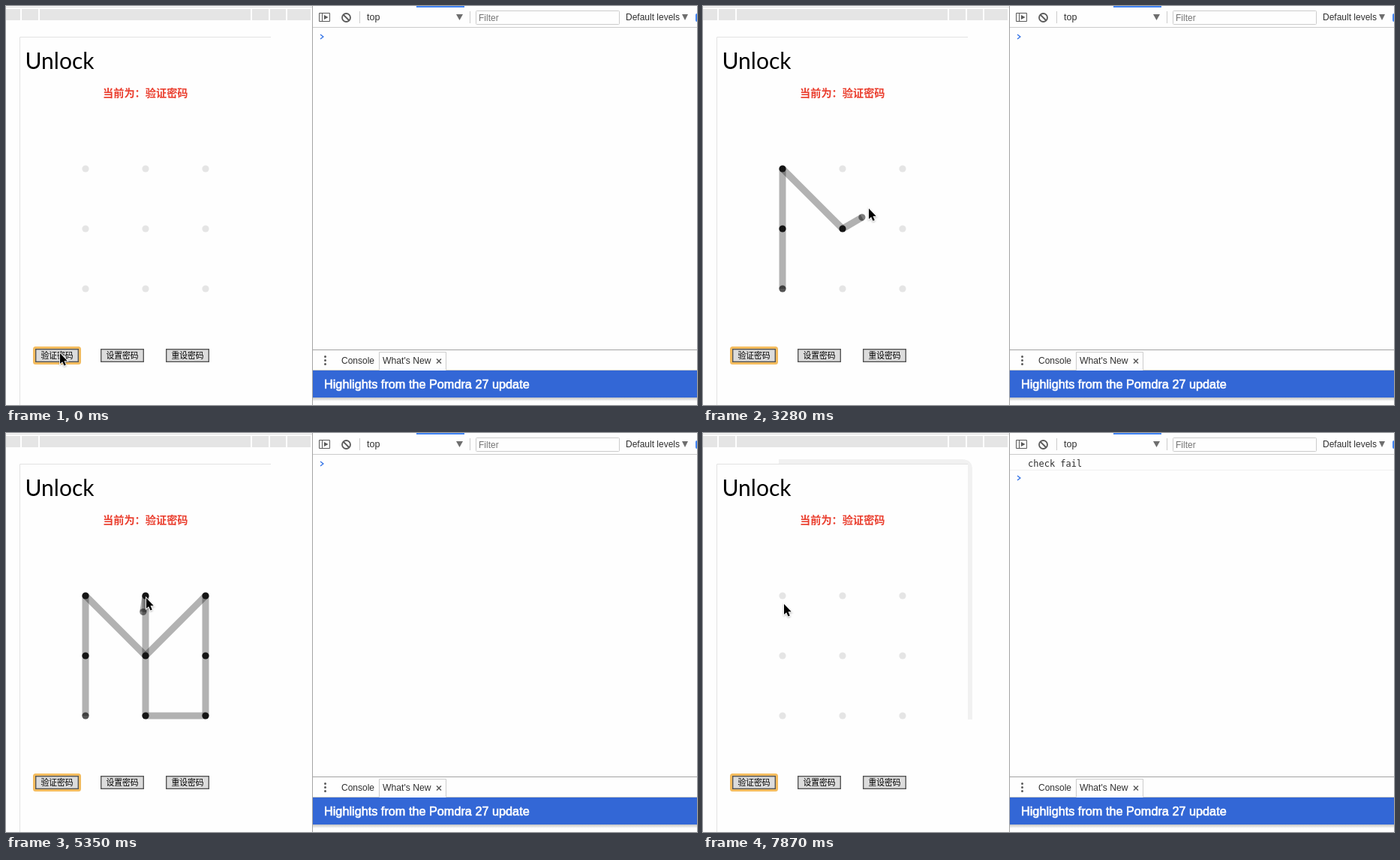
These frames come from a looping animation (921x532 px, 8 s). An HTML page:

```html
<!DOCTYPE html>
<html lang="zh-CN">
<head>
<meta charset="utf-8">
<title>Pattern unlock</title>
<style>
  html, body { margin: 0; width: 100%; height: 100%; overflow: hidden; background: #fefefe; }
  svg { display: block; width: 921px; height: 532px; }
  text { font: 12px "Liberation Sans", Arial, sans-serif; fill: #303030; white-space: pre; }
  .title { font: 30px Lato, sans-serif; fill: #000; }
  .mode { font: bold 14.2px "Noto Sans CJK SC", "Noto Sans CJK", sans-serif; fill: #ea3e2e; }
  .button { font: 10.8px "Noto Sans CJK SC", "Noto Sans CJK", sans-serif; fill: #000; }
  .headline { font-size: 16.25px; fill: #fff; stroke: #fff; stroke-width: .6px; }
  .log { font: 12px "DejaVu Sans Mono", monospace; }
  .line { fill: none; stroke: #ccc; }
  .icon { fill: none; stroke: #5a5a5a; }
</style>
</head>
<body>
<svg viewBox="0 0 921 532">
  <rect width="921" height="532" fill="#fefefe"/>

  <!-- Page -->
  <path class="line" d="M0 1.5H408" style="stroke:#ddd"/>
  <rect y="4" width="406" height="15" fill="#e5e5e5"/>
  <path d="M20 4V19M44 4V19M327 4V19M351 4V19M374 4V19" stroke="#fefefe" stroke-width="2"/>
  <path id="shade" d="M101 35H345Q359 35 359 49V382H353V41H101Z" fill="#f1f1f1"/>
  <path class="line" d="M353 41.5H18.5V532" style="stroke:#e2e2e2"/>
  <text class="title" x="25.5" y="84">Unlock</text>
  <text class="mode" x="129" y="121">当前为：验证密码</text>
  <rect x="37.5" y="455.5" width="61" height="21" rx="2" fill="none" stroke="#f3bc5f" stroke-width="3"/>
  <g id="buttons"></g>
  <g id="pattern"></g>

  <!-- Console toolbar -->
  <path class="line" d="M408.5 0V532M409 458.5H921" style="stroke:#a3a3a3"/>
  <path class="line" d="M409 28.5H921M471.5 7V23M618.5 7V23"/>
  <rect x="547" width="64" height="2" fill="#4285f4"/>
  <path class="icon" d="M417.5 9.5H431.5V20.5H417.5ZM421.5 9.5V20.5"/>
  <path d="M424 12L429.5 15L424 18Z" fill="#5a5a5a"/>
  <g class="icon" stroke-width="1.8"><circle cx="453.5" cy="15.5" r="5.5"/><path d="M449.5 11.5L457.5 19.5"/></g>
  <path d="M600 11H609L604.5 19ZM901 11H909L905 19Z" fill="#6e6e6e"/>
  <text x="481" y="19" style="font-size:12.6px">top</text>
  <rect class="line" x="626.5" y="6.5" width="191" height="18" rx="1"/>
  <text x="630" y="20" style="fill:#757575">Filter</text>
  <text x="826" y="19">Default levels</text>
  <rect x="919" y="10" width="6" height="11" rx="2" fill="#4285f4"/>

  <!-- Console output -->
  <g id="log">
    <text class="log" x="433" y="45">check fail</text>
    <path class="line" d="M409 49.5H921" style="stroke:#f0f0f0"/>
  </g>
  <path id="prompt" d="M419 38L422.8 41L419 44" fill="none" stroke="#3b78e7" stroke-width="1.5"/>

  <!-- Drawer -->
  <path class="icon" d="M425.500 467.500V478" stroke-width="3" stroke-linecap="round" stroke-dasharray="0 5"/>
  <text x="447" y="477">Console</text>
  <path class="line" d="M409 485.5H497.5V461.5H586.5V485.5H921"/>
  <text x="502" y="477" style="font-size:12.2px">What's New</text>
  <path class="icon" d="M574 470.5L580 476.5M580 470.5L574 476.5" stroke-width="1.5"/>
  <linearGradient id="fade" x2="0" y2="1"><stop stop-color="#c4c4c4"/><stop offset="1" stop-color="#fefefe"/></linearGradient>
  <rect x="409" y="522" width="512" height="5" fill="url(#fade)"/>
  <rect x="409" y="486" width="512" height="36" fill="#3367d6"/>
  <text class="headline" x="424" y="510">Highlights from the Pomdra 27 update</text>

  <path id="cursor" d="M0 -1V13L3.2 10.2L5.5 15.5L7.800 14.500L5.500 9.300H9.800Z" stroke="#fff" stroke-width="1.8" paint-order="stroke" style="filter:drop-shadow(0 1px 1px #0004)"/>
</svg>
<script>
const LOOP = 8000, STEP = 148.4;
const HOVER = 4, PRESS = 13, RELEASE = 37, FAIL = 38, LEAVE = 40, CLEAR = 45, REST = 53;
const HIT_RADIUS = 24, LAG = .35;

// Turning points of the drag: step, x, y
const drag = [
  [13, 101, 376], [14, 78, 233], [15, 72, 225], [16, 60, 215], [18, 105, 217],
  [20, 169, 281], [21, 195, 302], [22, 221, 271], [24, 268, 216], [26, 298, 270],
  [28, 284, 369], [32, 172, 385], [33, 151, 371], [36, 187, 221], [LEAVE, 191, 231]
];

const $ = id => document.getElementById(id);
const mix = (a, b, k) => a.map((v, i) => v + (b[i] - v) * k);
const ease = k => k * k * (3 - 2 * k);
const distance = ([x1, y1], [x2, y2]) => Math.hypot(x1 - x2, y1 - y2);
const nodes = Array.from({ length: 9 }, (_, i) => [106 + 80 * (i % 3), 217 + 80 * Math.floor(i / 3)]);

function hover(step) {
  const swing = Math.cos((step - 7) / 5 * Math.PI);
  return [99 - 3 * swing, 341.5 - 43.5 * swing];
}

function pointer(step) {
  if (step <= HOVER) {
    const k = step / HOVER;
    const [x, y] = mix([72, 464], hover(HOVER + 1), k);
    return [x - 18 * Math.sin(Math.PI * k), y];
  }
  if (step < PRESS) return hover(Math.max(step, HOVER + 1));
  if (step >= LEAVE) return mix([191, 231], [108, 229], ease((step - LEAVE) / (REST - LEAVE)));
  const i = drag.findIndex(p => p[0] > step);
  const [a, ...from] = drag[i - 1], [b, ...to] = drag[i];
  return mix(from, to, (step - a) / (b - a));
}

// A node joins when the pointer comes near; a free node halfway to it joins first.
function joinedNodes(step) {
  const joined = [];
  for (let s = PRESS; s <= step && s < RELEASE; s++) {
    const next = nodes.find(n => !joined.includes(n) && distance(n, pointer(s)) < HIT_RADIUS);
    if (!next) continue;
    const last = joined.at(-1);
    const between = last && nodes.find(n => distance(n, mix(last, next, .5)) < 1);
    if (between && !joined.includes(between)) joined.push(between);
    joined.push(next);
  }
  return joined;
}

const dot = ([x, y], fill, opacity = 1) =>
  `<circle cx="${x}" cy="${y}" r="4.6" fill="${fill}" fill-opacity="${opacity}"/>`;
const segment = ([x1, y1], [x2, y2], color) =>
  `<path d="M${x1} ${y1}L${x2} ${y2}" stroke="${color}" stroke-width="9"/>`;

function drawPattern(step) {
  const grid = nodes.map(n => dot(n, '#e5e5e5')).join('');
  if (step < PRESS || step >= CLEAR) return grid;

  const failed = step >= FAIL;
  const line = failed ? 'rgba(234,62,46,.38)' : 'rgba(0,0,0,.3)';
  const fill = failed ? '#ef4836' : '#151515';
  const joined = joinedNodes(step);
  // The loose end trails slightly behind the pointer.
  const end = step > PRESS && step < RELEASE && mix(pointer(step), pointer(step - 1), LAG);
  const points = end ? [...joined, end] : joined;
  const lines = points.slice(1).map((p, i) => segment(points[i], p, line)).join('');
  const dots = joined.map((p, i) => dot(p, fill, i || joined.length < 2 ? 1 : .7)).join('');
  return grid + lines + (end ? dot(end, '#000', .5) : '') + dots;
}

$('buttons').innerHTML = ['验证密码', '设置密码', '重设密码'].map((label, i) => {
  const x = 39 + Math.floor(87.3 * i);
  return `<rect x="${x + .7}" y="457.7" width="56.6" height="16.6" fill="#dcdcdc" stroke="#555" stroke-width="1.4"/>
    <text class="button" x="${x + 7.4}" y="469.5">${label}</text>`;
}).join('');

function render(time) {
  const step = Math.min(REST, Math.floor(time % LOOP / STEP));
  const failed = step >= FAIL;
  $('pattern').innerHTML = drawPattern(step);
  $('cursor').setAttribute('transform', `translate(${pointer(step)})`);
  $('shade').style.display = $('log').style.display = failed ? '' : 'none';
  $('prompt').setAttribute('transform', `translate(0 ${failed ? 19 : 0})`);
}

const start = performance.now();
function tick() {
  render(performance.now() - start);
  requestAnimationFrame(tick);
}
tick();
</script>
</body>
</html>
```
